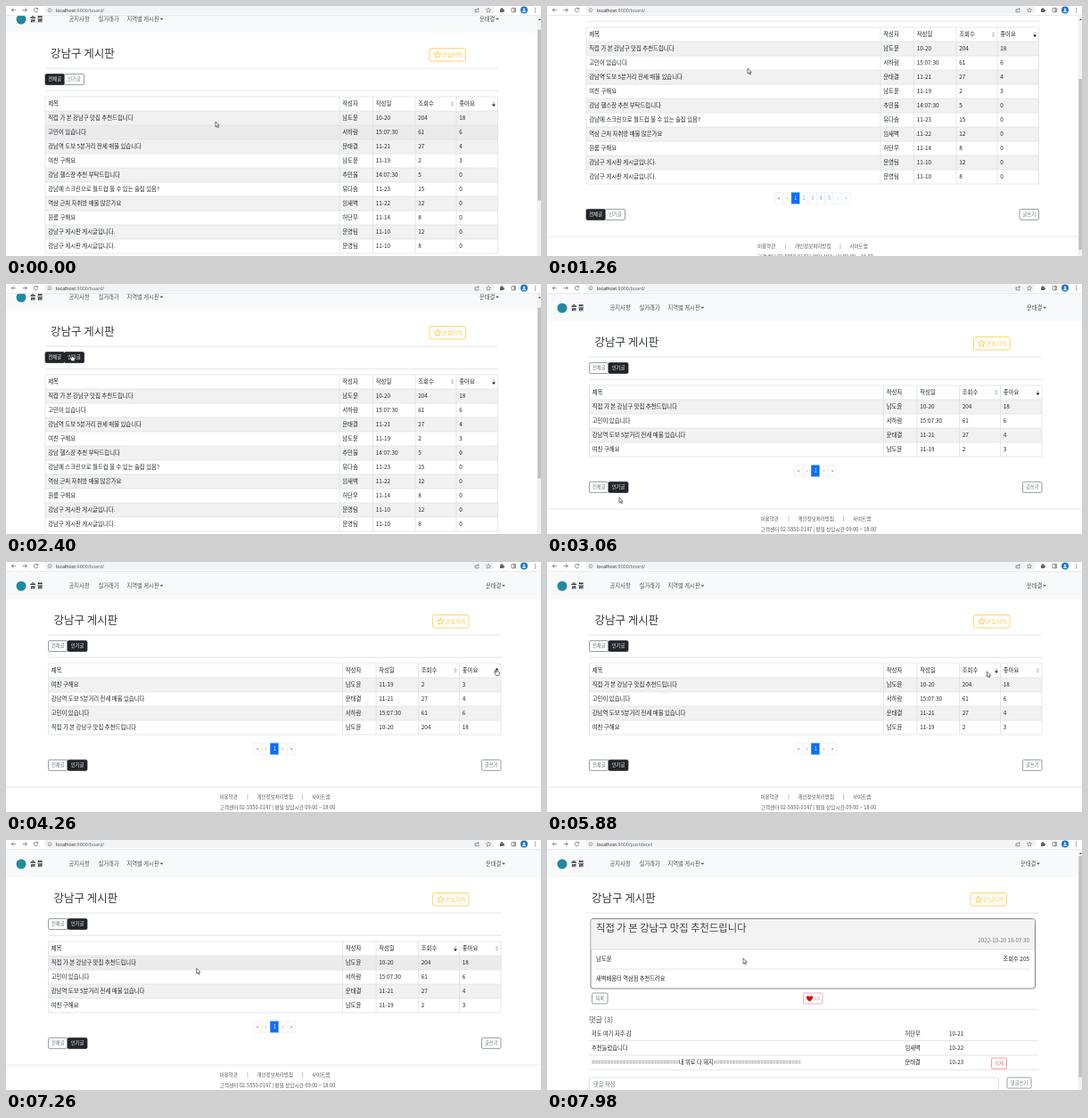
Write an HTML page with a canvas that moves like this. It is 600 by 281 pixels and loops after 8000 ms.

```html
<!DOCTYPE html>
<html lang="ko">
<head>
<meta charset="utf-8">
<title>게시판</title>
<style>
html, body { margin: 0; width: 100%; height: 100%; overflow: hidden; background: #fff; }
canvas { display: block; width: 600px; height: 281px; }
</style>
</head>
<body>
<canvas id="stage"></canvas>
<script>
const LOOP = 8000, STEP = 60, BAR = 11;
const KR = '"Noto Sans CJK KR", "Noto Sans CJK", sans-serif';
const INK = '#212529', GREY = '#6c757d', RULE = '#dcdee0', AMBER = '#ffc74a', BLUE = '#0d6efd';
const USER = '문태결';

const posts = [
  ['직접 가 본 강남구 맛집 추천드립니다', '남도윤', '10-20', 204, 18],
  ['고민이 있습니다', '서하람', '15:07:30', 61, 6],
  ['강남역 도보 5분거리 전세 매물 있습니다', USER, '11-21', 27, 4],
  ['여친 구해요', '남도윤', '11-19', 2, 3],
  ['강남 헬스장 추천 부탁드립니다', '추민율', '14:07:30', 5, 0],
  ['강남에 스크린으로 월드컵 볼 수 있는 술집 있음?', '유다솜', '11-23', 15, 0],
  ['역삼 근처 자취방 매물 많은가요', '임새벽', '11-22', 12, 0],
  ['원룸 구해요', '허단우', '11-14', 8, 0],
  ['강남구 게시판 게시글입니다.', '운영팀', '11-10', 12, 0],
  ['강남구 게시판 게시글입니다.', '운영팀', '11-10', 8, 0]
];
const columns = [47.5, 377.5, 415, 462.5, 508.5, 555];
const heads = ['제목', '작성자', '작성일', '조회수', '좋아요'];

// cursor path: time, x, y
const path = [
  [0, 235, 130], [840, 225, 70], [1560, 225, 70], [1860, 67, 57], [2160, 75, 79],
  [2340, 75, 79], [2400, 74, 79], [2580, 74, 79], [3060, 81, 240], [3360, 545, 113],
  [3720, 556, 112], [4020, 550, 120], [4680, 550, 120], [5220, 503, 120], [5820, 503, 120],
  [6240, 330, 175], [6600, 196, 155], [6960, 205, 160], [7500, 220, 133], [LOOP, 220, 133]
];

const canvas = document.getElementById('stage');
const ctx = canvas.getContext('2d');
const dpr = window.devicePixelRatio || 1;
canvas.width = 600 * dpr;
canvas.height = 281 * dpr;

const ease = p => p * p * (3 - 2 * p);
const ramp = (t, a, b) => ease(Math.min(1, Math.max(0, (t - a) / (b - a))));

function cursorAt(t) {
  const i = path.findIndex(k => k[0] > t);
  const [t0, x0, y0] = path[i - 1], [t1, x1, y1] = path[i];
  const p = ramp(t, t0, t1);
  return [x0 + (x1 - x0) * p, y0 + (y1 - y0) * p];
}

// y is the vertical middle of the line
function text(s, x, y, size = 6.4, color = INK, align = 'left', weight = 400, font = KR) {
  ctx.font = `${weight} ${size}px ${font}`;
  ctx.textAlign = align;
  ctx.fillStyle = color;
  ctx.fillText(s, x, y + size * 0.36);
}
function rect(x, y, w, h, color) {
  ctx.fillStyle = color;
  ctx.fillRect(x, y, w, h);
}
function line(x0, y0, x1, y1, color = RULE, width = 0.8) {
  ctx.strokeStyle = color;
  ctx.lineWidth = width;
  ctx.beginPath();
  ctx.moveTo(x0, y0);
  ctx.lineTo(x1, y1);
  ctx.stroke();
}
function box(x, y, w, h, r, fill, stroke, width = 0.7) {
  ctx.beginPath();
  ctx.roundRect(x, y, w, h, r);
  if (fill) { ctx.fillStyle = fill; ctx.fill(); }
  if (stroke) { ctx.strokeStyle = stroke; ctx.lineWidth = width; ctx.stroke(); }
}
function dot(x, y, r, color) {
  ctx.fillStyle = color;
  ctx.beginPath();
  ctx.arc(x, y, r, 0, 7);
  ctx.fill();
}
function shape(d, x, y, fill, stroke, width = 0.7) {
  const p = new Path2D(d);
  ctx.save();
  ctx.translate(x, y);
  if (fill) { ctx.fillStyle = fill; ctx.fill(p); }
  if (stroke) { ctx.strokeStyle = stroke; ctx.lineWidth = width; ctx.stroke(p); }
  ctx.restore();
}
const caret = (x, y) => shape('M-2-1h4l-2 2z', x, y, '#555');
const starPath = r => 'M' + Array.from({ length: 10 }, (_, i) => {
  const a = i * Math.PI / 5, q = i % 2 ? r * 0.45 : r;
  return `${Math.sin(a) * q} ${-Math.cos(a) * q}`;
}).join('L') + 'z';

function button(label, x, y, w, color, filled, r = 1.5) {
  box(x, y - 6, w, 12, r, filled ? color : '#fff', color);
  text(label, x + w / 2, y, 5.3, filled ? '#fff' : color, 'center');
}
function tabs(y, popular, hover) {
  button('전체글', 47.5, y, 21.5, popular ? GREY : INK, !popular);
  button('인기글', 69, y, 22, popular || hover ? INK : GREY, popular || hover);
}
function sortIcon(x, y, dir) {
  shape('M-1.9-.5L0-3 1.9-.5z', x, y, dir === 'up' ? '#000' : '#c2c4c6');
  shape('M-1.9 .5L0 3 1.9 .5z', x, y, dir === 'down' ? '#000' : '#c2c4c6');
}

function nav(shift) {
  rect(0, BAR, 602, 31, '#f8f9fa');
  dot(17, 27, 5.5, '#2389a0');
  text('솔 뜰', 27, 26.5, 7, INK, 'left', 700);
  text('공지사항', 70.5, 26.8, 6.3, '#555');
  text('실거래가', 103.5, 26.8, 6.3, '#555');
  text('지역별 게시판', 135.5, 26.8, 6.3, '#555');
  caret(174.5, 26.8);
  text(USER, 538 - shift * 2, 26.8, 6.3, '#555');
  caret(558 - shift * 2, 26.8);
}
function heading() {
  text('강남구 게시판', 53.5, 65, 12.5, '#33383c', 'left', 300);
  box(478.5, 59.5, 40.5, 14.5, 2, '#fff', AMBER, 0.8);
  shape(starPath(4), 487.5, 67, null, AMBER, 0.9);
  text('관심지역', 492.5, 66.8, 6.2, AMBER);
  line(47.5, 82, 555.5, 82);
}

function table(rows, sort, hover) {
  const bottom = 130 + rows.length * 16;
  rows.forEach((row, i) => {
    const y = 130 + i * 16;
    if (i === hover) rect(47.5, y, 507.5, 16, '#ebebec');
    else if (i % 2 === 0) rect(47.5, y, 507.5, 16, '#f1f1f1');
    row.forEach((cell, c) => text(cell, columns[c] + 3.2, y + 8));
  });
  heads.forEach((head, c) => text(head, columns[c] + 3.2, 122));
  for (let y = 114; y <= bottom; y += 16) line(47.5, y, 555, y, '#dee2e6');
  columns.forEach(x => line(x, 114, x, bottom, '#dee2e6'));
  sortIcon(504, 122, sort.views);
  sortIcon(550.5, 122, sort.likes);
  return bottom;
}
function pager(y, pages) {
  const labels = ['«', '‹', ...pages, '›', '»'];
  const w = 9.4, x = 301.2 - labels.length * w / 2;
  labels.forEach((label, i) => {
    const on = label === 1;
    box(x + i * w, y - 6.2, w, 12.4, 0, on ? BLUE : '#fff', on ? BLUE : '#e3e6e9', 0.5);
    const last = pages.length > 1 && i > 1;
    text(label, x + (i + 0.5) * w, y, 5.6, on ? '#fff' : last ? '#6ea8fe' : '#555', 'center');
  });
}
function footer(y) {
  line(0, y, 602, y, '#dfe1e3');
  ['이용약관', '개인정보처리방침', '사이트맵'].forEach((s, i) =>
    text(s, [239.5, 281.5, 343][i], y + 11, 5.5, '#555'));
  text('|', 271, y + 11, 5.5, '#555', 'center');
  text('|', 332.5, y + 11, 5.5, '#555', 'center');
  text('고객센터 02-5550-0147 | 평일 상담시간 09:00 ~ 18:00', 239.5, y + 23.3, 5.7, '#555');
}

function board(t, popular, tip, scroll) {
  const rows = popular ? posts.slice(0, 4) : posts;
  const up = t >= 4020 && t < 4620, viewsUp = t >= 5400 && t < 5580;
  if (up || viewsUp) rows.reverse();
  const sort = t >= 5400
    ? { views: viewsUp ? 'up' : 'down' }
    : { likes: up ? 'up' : 'down' };
  let hover = Math.floor((tip[1] + scroll - 130) / 16);
  // hover lags behind while the page scrolls
  if (t < 60 || (t >= 1320 && t < 1620)) hover = 1;
  else if (scroll > 12) hover = -1;
  heading();
  tabs(94.5, popular, t >= 2100 && t < 2580);
  line(47.5, 107.2, 555.5, 107.2);
  const end = table(rows, sort, hover);
  pager(end + 16, popular ? [1] : [1, 2, 3, 4, 5]);
  tabs(end + 34.4, popular, false);
  button('글쓰기', 533.5, end + 34.4, 21.5, GREY);
  footer(end + 59);
}

function post() {
  heading();
  box(52.5, 88.5, 498.5, 78.5, 3, '#fff', '#777', 0.9);
  box(53, 89, 497.5, 34, [2.5, 2.5, 0, 0], '#f3f3f4');
  line(53, 123, 550.5, 123, '#d8d8d8');
  text(posts[0][0], 58.5, 99, 11.3, '#444', 'left', 300);
  text('2022-10-20 16:07:30', 544.5, 112.5, 6.25, GREY, 'right');
  text(posts[0][1], 58.5, 133.3);
  text('조회수 205', 544.5, 133.3, 6.4, INK, 'right');
  line(58.5, 145, 544.5, 145);
  text('새벽배움터 역삼점 추천드려요', 58.5, 156, 6.25);
  button('목록', 54, 178, 17.5, GREY);
  box(291, 172, 21.5, 12, 1.5, '#fff', '#ea868f');
  shape('M0 3.6C-6-.6-3.6-4.6 0-1.8 3.6-4.6 6-.6 0 3.6z', 298, 178, '#e00000');
  text('18', 306.5, 178, 5.3, '#ea868f', 'center');
  line(50.5, 190.3, 554.5, 190.3);
  text('댓글 (3)', 50.5, 202, 8.2, '#555', 'left', 300);
  const bars = '='.repeat(28);
  [
    ['저도 여기 자주 감', '허단우', '10-21'],
    ['추천눌렀습니다', '임새벽', '10-22'],
    [bars + '내 위로 다 돼지' + bars, USER, '10-23']
  ].forEach((row, i) => {
    const y = 217.3 + i * 16.3;
    row.forEach((cell, c) => text(cell, [53.5, 405, 454.5][c], y, 6.3));
    line(50.5, y + 8.3, 554.5, y + 8.3);
  });
  button('삭제', 502, 251, 17, '#e8707b');
  box(51, 267, 459, 18, 2, '#fff', '#ced4da');
  text('댓글 작성', 55.5, 274.5, 6.3, GREY);
  button('댓글쓰기', 519.5, 273, 27, GREY);
}

function scrollbar(scroll, height) {
  rect(595.5, BAR, 6, 270, '#f1f1f1');
  shape('M-1.6 1L0-1 1.6 1z', 598.5, 15, '#666');
  const track = 256, scale = track / height;
  rect(596.3, 18 + scroll * scale, 5, 270 * scale, '#c1c1c1');
}

function toolbar(page) {
  rect(0, 0, 600, BAR, '#fff');
  box(43, -2, 505, 11.3, 5, '#f1f3f4');
  line(0, 10.6, 600, 10.6, '#dadce0', 0.6);
  const icon = '#5f6368';
  shape('M2.4 0H-2.4M0-2.2L-2.4 0 0 2.2', 8.5, 4.5, null, icon);
  shape('M-2.4 0H2.4M0-2.2L2.4 0 0 2.2', 21, 4.5, null, icon);
  shape('M2-1.2A2.3 2.3 0 1 0 2.2 .8M2.3-2.5V-.9H.7', 33.5, 4.5, null, icon);
  shape('M2 0A2 2 0 1 1-2 0 2 2 0 1 1 2 0M0-.2V1.1M0-1.1V-.7', 49, 4.6, null, icon, 0.5);
  const font = '"Open Sans", sans-serif', host = 'localhost';
  text(host, 56, 4.6, 5.3, '#202124', 'left', 400, font);
  const w = ctx.measureText(host).width;
  text(':9000/' + page, 56 + w, 4.6, 5.3, icon, 'left', 400, font);
  shape('M-.5-1H-2V2.2H2V.8M-.8 1C-.6-.7 .4-1.2 2.2-1.2M1-2.5L2.4-1.2 1 .1', 528, 4.6, null, icon, 0.6);
  shape(starPath(2.8), 541, 4.8, null, icon, 0.5);
  shape('M-2-1.2H-.6A.8 .8 0 1 1 .8-1.2H2V.2A.8 .8 0 1 1 2 1.4V2.5H-2z', 556, 4.4, icon);
  box(567, 2.3, 4.6, 4.6, 0.5, null, icon);
  line(570, 2.3, 570, 6.9, icon, 1);
  dot(581, 4.6, 4, '#1a73c8');
  dot(581, 3.7, 1.3, '#cfe3f7');
  shape('M-2.2 2.4A2.2 2 0 0 1 2.2 2.4z', 581, 4.6, '#cfe3f7');
  [2.5, 4.6, 6.7].forEach(y => dot(593.5, y, 0.6, icon));
}

function pointer([x, y], hand) {
  if (hand) shape('M-.6 .4Q0-.6 .7 .4V3L3 3.4Q3.7 3.8 3.4 5L2.8 7.6H-.4L-2.2 4.8Q-2-.0 -.6 4.5z', x, y, '#fff', '#222', 0.6);
  else shape('M0 0V6L1.4 4.8 2.4 7 3.4 6.5 2.4 4.4H4.2z', x, y, '#fff', '#222', 0.6);
}

function draw(t) {
  const isPost = t >= 7680, popular = t >= 2580 && !isPost;
  const scroll = popular || isPost ? 0 : 12 + 78 * (ramp(t, 990, 1240) - ramp(t, 1310, 1550));
  const shift = popular ? 0 : 3.5;
  const tip = cursorAt(t);
  ctx.setTransform(dpr, 0, 0, dpr, 0, 0);
  rect(0, 0, 600, 281, '#fff');
  ctx.save();
  ctx.translate(0, -scroll);
  nav(shift);
  ctx.translate(-shift, 0);
  if (isPost) post();
  else board(t, popular, tip, scroll);
  ctx.restore();
  if (!popular) scrollbar(scroll, isPost ? 278 : 360);
  toolbar(isPost ? 'postdetail' : 'board/');
  pointer(tip, (t >= 2340 && t < 2640) || (t >= 3960 && t < 5880));
}

function frame() {
  draw(Math.floor(performance.now() % LOOP / STEP) * STEP);
  requestAnimationFrame(frame);
}
frame();
</script>
</body>
</html>
```
